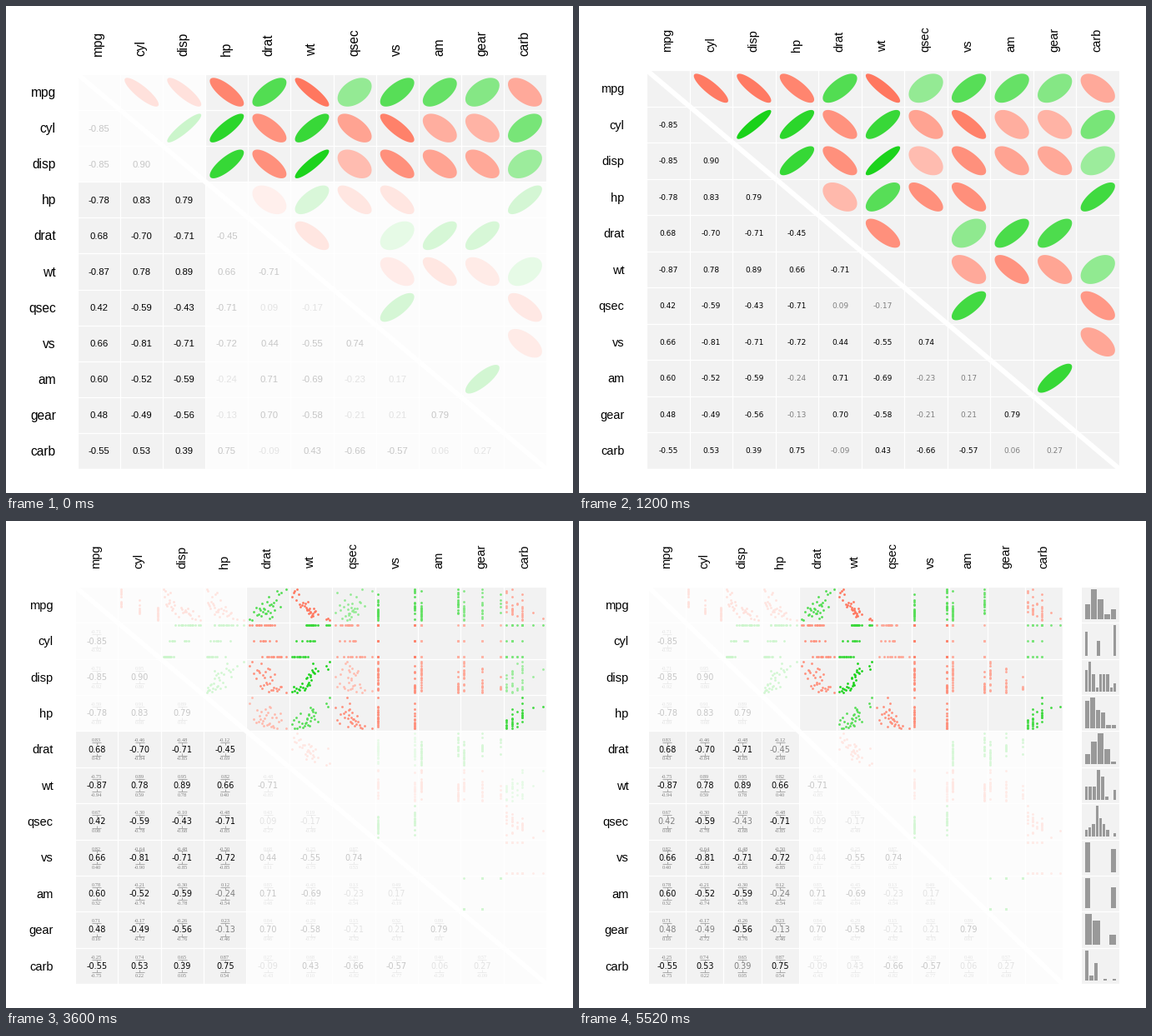
Animation, 680 px wide and 585 px high, one loop 6000 ms. Source, as a matplotlib script:

```python
import numpy as np
import matplotlib.pyplot as plt
from matplotlib.animation import FuncAnimation
from matplotlib.patches import Polygon, Rectangle

W, H, DPI = 680, 585, 100
PX = 72 / DPI  # points per pixel
RIGHT, BOTTOM, HIST_LEFT = 648, 556, 603
PANEL, BAR = "#f2f2f2", "#999999"
GREEN, RED = np.array([0, 205, 0]) / 255, np.array([255, 99, 71]) / 255
SANS, WIDE, SERIF = "Liberation Sans", "DejaVu Sans", "Liberation Serif"

# variable: (counts, histogram bins if the counts belong to discrete levels)
VARS = {
    "mpg": ([6, 12, 8, 2, 4], None),
    "cyl": ([11, 7, 14], 8),
    "disp": ([5, 7, 4, 1, 4, 4, 4, 1, 2], None),
    "hp": ([9, 10, 6, 5, 1, 1], None),
    "drat": ([4, 9, 12, 6, 1], None),
    "wt": ([4, 4, 4, 9, 7, 1, 0, 3], None),
    "qsec": ([2, 3, 4, 10, 6, 4, 2, 0, 1], None),
    "vs": ([18, 14], 5),
    "am": ([19, 13], 5),
    "gear": ([15, 12, 5], 4),
    "carb": ([7, 10, 3, 10, 0, 1, 0, 1], 7),
}
NAMES = list(VARS)
N, SAMPLES = len(NAMES), 32

# printed coefficients, in percent, below the diagonal
LOWER = [
    [-85],
    [-85, 90],
    [-78, 83, 79],
    [68, -70, -71, -45],
    [-87, 78, 89, 66, -71],
    [42, -59, -43, -71, 9, -17],
    [66, -81, -71, -72, 44, -55, 74],
    [60, -52, -59, -24, 71, -69, -23, 17],
    [48, -49, -56, -13, 70, -58, -21, 21, 79],
    [-55, 53, 39, 75, -9, 43, -66, -57, 6, 27],
]
CORR = np.eye(N)
for i, row in enumerate(LOWER, 1):
    CORR[i, :i] = CORR[:i, i] = np.array(row) / 100
HALF_CI = 1.96 / np.sqrt(SAMPLES - 3)


def spread(counts, bins):
    """Sorted sample, scaled to 0..1, that has the given counts."""
    if bins:
        v = np.repeat(np.arange(len(counts)), counts)
    else:
        v = np.concatenate([k + (np.arange(c) + 0.5) / c for k, c in enumerate(counts) if c])
    return (v - v.min()) / (v.max() - v.min())


def correlated_sample():
    """Random draws with the right correlations, mapped by rank to each spread."""
    z = np.random.default_rng(7).normal(size=(SAMPLES, N))
    q = np.linalg.svd(z - z.mean(axis=0), full_matrices=False)[0]
    val, vec = np.linalg.eigh(CORR)
    x = q @ (vec * np.sqrt(np.maximum(val, 0))).T
    ranks = x.argsort(axis=0).argsort(axis=0)
    return [spread(*VARS[name])[ranks[:, k]] for k, name in enumerate(NAMES)]


UNIT = correlated_sample()

# block: size of the first variable group; cut: smallest significant |r|
LATE = dict(left=83, top=79, block=4, label=14.6, num=9.8, ci=True)
SCENES = [
    dict(left=86, top=82, block=3, label=15.5, num=11.2, font=SANS),
    dict(left=81, top=77, label=14.5, num=9),
    LATE,
    dict(LATE, dots=True),
    dict(LATE, dots=True, right=580, cut=0.5, hist=True),
]

fig = plt.figure(figsize=(W / DPI, H / DPI), dpi=DPI, facecolor="white")
ax = fig.add_axes([0, 0, 1, 1])


def box(x0, y0, x1, y1, color, **kw):
    ax.add_patch(Rectangle((x0, y0), x1 - x0, y1 - y0, fc=color, lw=0, **kw))


def line(xs, ys, color, width, z):
    ax.plot(xs, ys, color=color, lw=width * PX, zorder=z, solid_capstyle="butt")


def text(x, y, s, size, color="black", ha="center", font=SANS, rot=0):
    x, y = (x + 0.25 * size, y) if rot else (x, y + 0.36 * size)
    ax.text(x, y, s, fontsize=size * PX, color=color, ha=ha, va="baseline",
            family=font, rotation=rot, rotation_mode="anchor", zorder=4)


def shade(r):
    return 1 - abs(r) * (1 - (GREEN if r > 0 else RED))


def ellipse(cx, cy, cw, ch, r):
    t = np.linspace(0, 2 * np.pi, 120)
    d = np.arccos(r) / 2
    pts = np.column_stack([cx + 0.4 * cw * np.cos(t + d), cy - 0.4 * ch * np.cos(t - d)])
    ax.add_patch(Polygon(pts, fc=shade(r), lw=0, zorder=3))


def dots(cx, cy, cw, ch, i, j):
    x = cx + 0.86 * cw * (UNIT[j] - 0.5)
    y = cy - 0.86 * ch * (UNIT[i] - 0.5)
    ax.scatter(x, y, s=(2.8 * PX) ** 2, color=shade(CORR[i, j]), lw=0, zorder=3)


def interval(cx, cy, r):
    for side in (1, -1):
        bound = np.tanh(np.arctanh(r) + side * HALF_CI)
        tip = cy - side * 7.8
        line([cx - 5.5, cx + 5.5], [tip, tip], BAR, 0.8, 4)
        line([cx, cx], [tip, tip + side * 3], BAR, 0.8, 4)
        text(cx, cy - side * 11, f"{bound:.2f}", 6.4, "0.5", font=SERIF)


def histogram(i, y0, ch):
    counts, bins = VARS[NAMES[i]]
    if bins:
        slot = np.ceil(UNIT[i] * bins - 1e-6).astype(int) - 1
        counts = np.bincount(np.maximum(slot, 0))
    box(HIST_LEFT, y0, RIGHT, y0 + ch, PANEL, zorder=1)
    cw = RIGHT - HIST_LEFT
    bw = 0.86 * cw / len(counts)
    base = y0 + 0.91 * ch
    for k, c in enumerate(counts):
        x = HIST_LEFT + 0.07 * cw + k * bw
        top = base - 0.84 * ch * c / max(counts)
        box(x + 0.5, top, x + bw - 0.5, base, BAR, zorder=3)


def draw(frame):
    s = SCENES[frame]
    left, top, right = s["left"], s["top"], s.get("right", RIGHT)
    cw, ch = (right - left) / N, (BOTTOM - top) / N
    xs, ys = left + cw * np.arange(N + 1), top + ch * np.arange(N + 1)
    cut = s.get("cut", 0.349)

    ax.clear()
    ax.set(xlim=(0, W), ylim=(H, 0))
    ax.axis("off")
    box(left, top, right, BOTTOM, PANEL, zorder=1)

    for i, name in enumerate(NAMES):
        cy = ys[i] + ch / 2
        text(left - cw / 2 - 0.7, cy, name, s["label"], ha="right")
        text(xs[i] + cw / 2, top - ch / 2, name, s["label"], ha="left", rot=90)
        if s.get("hist"):
            histogram(i, ys[i], ch)
        for j in range(N):
            cx, r = xs[j] + cw / 2, CORR[i, j]
            strong = abs(r) > cut
            if j < i:
                text(cx, cy, f"{r:.2f}", s["num"], "black" if strong else "0.5",
                     font=s.get("font", WIDE))
                if s.get("ci"):
                    interval(cx, cy, r)
            elif j > i and strong:
                if s.get("dots"):
                    dots(cx, cy, cw, ch, i, j)
                else:
                    ellipse(cx, cy, cw, ch, r)

    for x in xs:
        line([x, x], [top, BOTTOM], "white", 1.2, 2)
    for y in ys:
        line([left, RIGHT], [y, y], "white", 1.2, 2)
    line([left, right], [top, BOTTOM], "white", 6, 2)

    # veil the within-group blocks
    if "block" in s:
        xm, ym = xs[s["block"]], ys[s["block"]]
        box(left, top, xm, ym, "white", alpha=0.78, zorder=6)
        box(xm, ym, right, BOTTOM, "white", alpha=0.78, zorder=6)
    return []


anim = FuncAnimation(fig, draw, frames=len(SCENES), init_func=lambda: draw(0),
                     interval=1200, repeat=True, repeat_delay=0)
plt.show()
```
